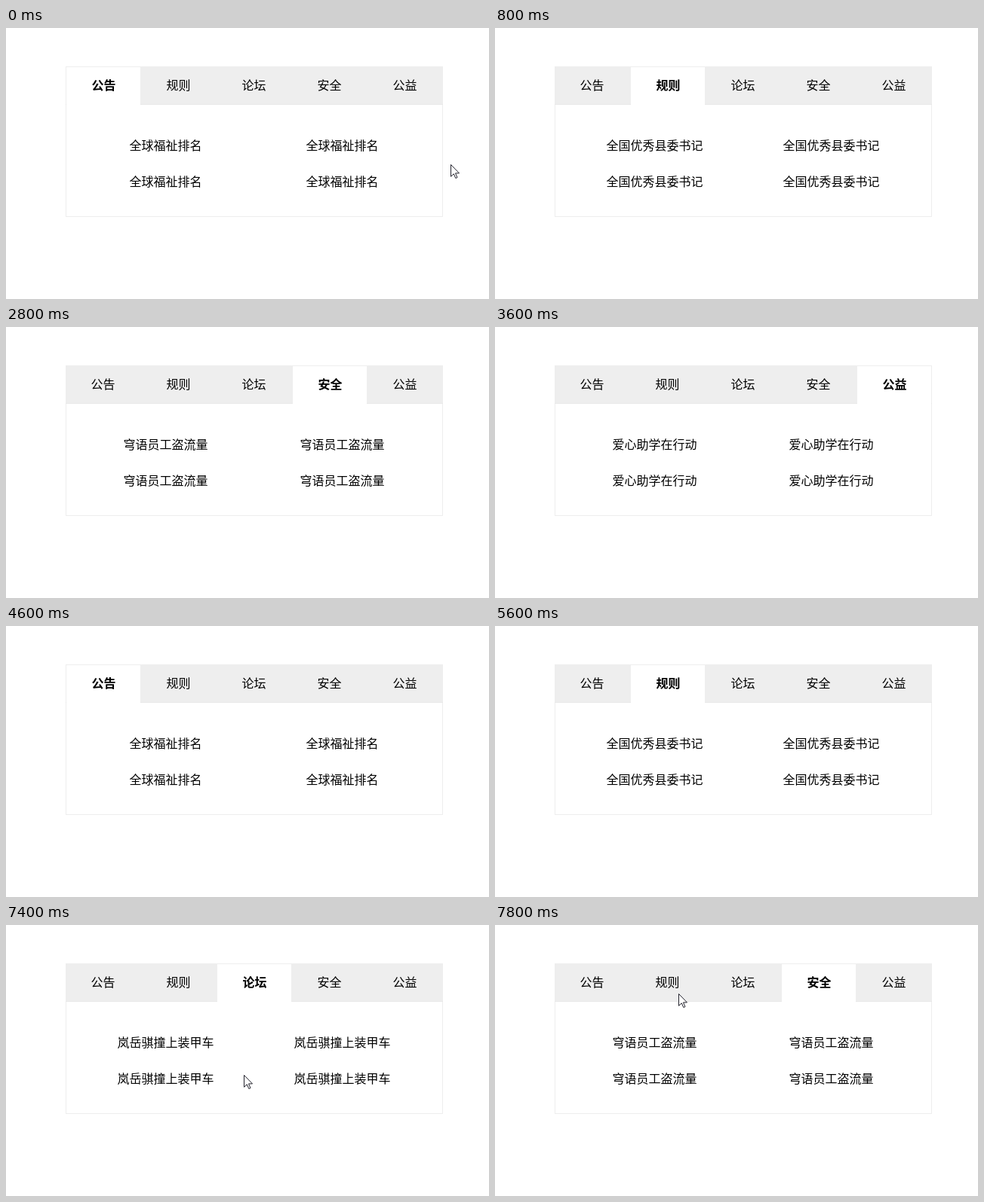
These frames come from a looping animation (640x360 px, 8 s). An HTML page:

```html
<!DOCTYPE html>
<html lang="zh-CN">
<head>
<meta charset="utf-8">
<style>
html, body { margin: 0; width: 100%; height: 100%; overflow: hidden; background: #fff; }
svg { display: block; width: 100vw; height: 100vh; }
text { font: 16px "Noto Sans CJK SC", "Noto Sans CJK", sans-serif; text-anchor: middle; fill: #000; }
.on { font-weight: bold; }
</style>
</head>
<body>
<svg id="stage" viewBox="0 0 640 360">
  <rect width="640" height="360" fill="#fff"/>
  <rect x="79.5" y="51.5" width="499" height="199" fill="#fff" stroke="#eee"/>
  <rect x="79" y="51" width="500" height="50" fill="#eee"/>
  <rect x="79" y="101" width="500" height="1" fill="#e8e8e8"/>
  <rect id="active" y="52" width="98" height="50" fill="#fff"/>
  <g id="tabs"></g>
  <g id="links"></g>
  <path id="cursor" d="M.5.5V16.3L4.3 12.8 6.8 18.5 9 17.6 6.5 11.9H11.5Z" fill="#fff" stroke="#23232d"/>
</svg>
<script>
const LOOP = 8000;
const panels = [
  ["公告", "全球福祉排名"],
  ["规则", "全国优秀县委书记"],
  ["论坛", "岚岳骐撞上装甲车"],
  ["安全", "穹语员工盗流量"],
  ["公益", "爱心助学在行动"]
];
// [start ms, tab]
const tabSteps = [[0, 0], [800, 1], [1800, 2], [2800, 3], [3600, 4], [4600, 0], [5600, 1], [6600, 2], [7600, 3]];
// [start ms, x, y]; no position means hidden
const cursorSteps = [[0, 589, 181], [200, 588, 181], [400, 611, 271], [600], [7400, 315, 199], [7600, 275, 125], [7800, 243, 91]];

const $ = id => document.getElementById(id);
const stepAt = (steps, t) => steps.filter(s => s[0] <= t).pop();
const tabX = (i, on) => 128.5 + 100 * i + (on ? 1 : 0);

function addText(parent, x, y, label) {
  const el = document.createElementNS("http://www.w3.org/2000/svg", "text");
  el.setAttribute("x", x);
  el.setAttribute("y", y);
  el.textContent = label;
  $(parent).append(el);
  return el;
}

const tabs = panels.map(([name], i) => addText("tabs", tabX(i), 82, name));
const links = [162, 210].flatMap(y => [211.5, 445.5].map(x => addText("links", x, y, "")));
let shown = -1;

function showTab(tab) {
  if (tab === shown) return;
  shown = tab;
  $("active").setAttribute("x", 80 + 100 * tab);
  tabs.forEach((el, i) => {
    el.setAttribute("class", i === tab ? "on" : "");
    el.setAttribute("x", tabX(i, i === tab));
  });
  links.forEach(el => { el.textContent = panels[tab][1]; });
}

function draw(t) {
  showTab(stepAt(tabSteps, t)[1]);
  const [, x, y] = stepAt(cursorSteps, t);
  const visible = x !== undefined;
  $("cursor").setAttribute("visibility", visible ? "visible" : "hidden");
  if (visible) $("cursor").setAttribute("transform", `translate(${x} ${y})`);
}

const start = performance.now();
function tick() {
  draw((performance.now() - start) % LOOP);
  requestAnimationFrame(tick);
}
tick();
</script>
</body>
</html>
```
